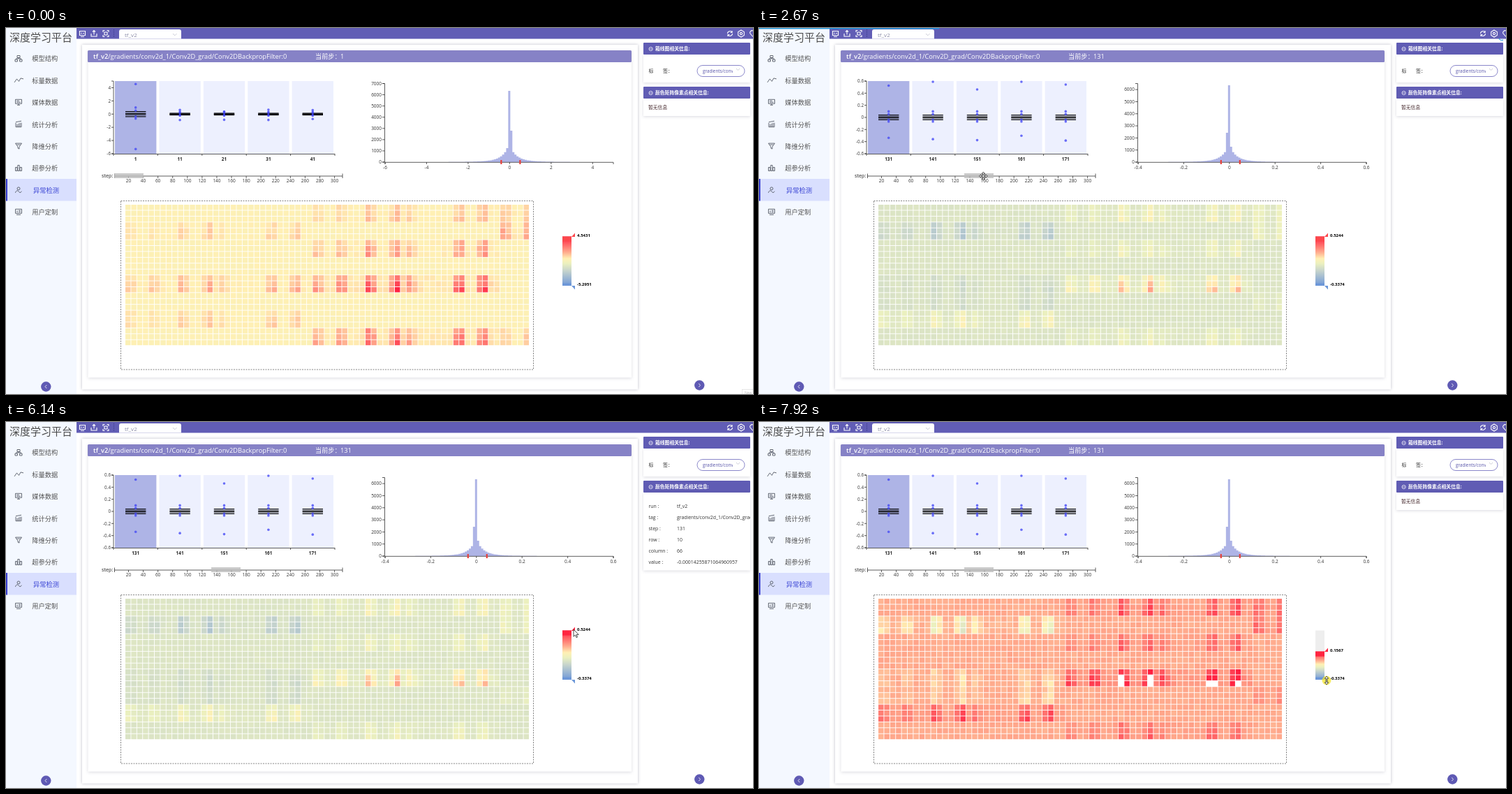
Write an HTML page that moves like this. It is 1070 by 524 pixels and loops after 7.99 s.

```html
<!DOCTYPE html>
<html lang="zh-CN">
<head>
<meta charset="utf-8">
<title>深度学习平台</title>
<style>
html, body { margin: 0; width: 1070px; height: 524px; overflow: hidden; background: #fff; }
svg { display: block; font-family: "Open Sans", "Noto Sans CJK SC", "Noto Sans CJK", sans-serif; }
.card { fill: #fff; filter: drop-shadow(0 0 2px rgba(70, 70, 100, .35)); }
.soft { fill: #fff; filter: drop-shadow(0 1px 2px rgba(70, 70, 100, .2)); }
.ico { fill: none; stroke: #555b66; stroke-width: .9; }
.wico { fill: none; stroke: #fff; stroke-width: 1.1; }
.thin { fill: none; stroke: #bfc1cf; stroke-width: .8; }
.ax { fill: none; stroke: #333; stroke-width: .8; }
</style>
</head>
<body>
<svg id="stage" width="1070" height="524" viewBox="0 0 1070 524" xmlns="http://www.w3.org/2000/svg">
  <defs>
    <linearGradient id="ramp" x1="0" y1="1" x2="0" y2="0"></linearGradient>
    <clipPath id="side"><rect x="913" y="0" width="153" height="524"/></clipPath>
    <clipPath id="pill"><rect x="995" y="50" width="46" height="24"/></clipPath>
  </defs>
  <g id="base"></g>
  <g id="boxes"></g>
  <g id="hist"></g>
  <rect id="brush" y="208" width="42" height="7" fill="#bdbdbd" fill-opacity=".8"/>
  <g id="heat"></g>
  <rect id="scroll" x="172" y="478" width="52" height="3.5" rx="1.7" fill="#b0b4e8"/>
  <g id="legend"></g>
  <g id="info"></g>
  <g id="load">
    <rect id="bar" width="0" height="1.4" fill="#2299dd"/>
    <path id="spin" d="M1059.5 13a4.5 4.5 0 0 1 4.5-4.5" fill="none" stroke="#2299dd"/>
  </g>
  <g id="tip">
    <rect x="1054.5" y="517.5" width="18" height="9" fill="#fff" stroke="#ddd" stroke-width=".7"/>
    <text x="1058" y="523.5" font-size="5" fill="#bbb">New</text>
  </g>
  <circle id="glow" r="6.5" fill="#f6e72c" fill-opacity=".75"/>
  <g id="pointer" fill="#fff" stroke="#222" stroke-width=".8">
    <path id="arrow" d="M0 0V10.2L2.4 8L4 11.6L5.6 10.9L4 7.4H7.2Z"/>
    <path id="move" d="M0-6L2.2-3.4H.8V-.8H3.4V-2.2L6 0L3.4 2.2V.8H.8V3.4H2.2L0 6L-2.2 3.4H-.8V.8H-3.4V2.2L-6 0L-3.4-2.2V-.8H-.8V-3.4H-2.2Z"/>
    <path id="resize" d="M0-6L2.6-2.8H.8V2.8H2.6L0 6L-2.6 2.8H-.8V-2.8H-2.6Z"/>
  </g>
</svg>
<script>
const LOOP = 7990, ROWS = 24, COLS = 69, PW = 8.39, PH = 8.42, GAP = .9;
const LEFT = 171, TOP = 253, CUT = .1567;
const $ = id => document.getElementById(id);
const lerp = (a, b, k) => a + (b - a) * k;
const mixAll = (a, b, k) => a.map((v, i) => lerp(v, b[i], k));
const clamp = (v, a = 0, b = 1) => Math.max(a, Math.min(b, v));
const ease = k => k * k * (3 - 2 * k);
const within = (t, a, b) => t >= a && t < b;
const show = (id, on) => $(id).setAttribute('visibility', on ? 'visible' : 'hidden');
const rand = (a, b) => { const n = Math.sin(a * 127.1 + b * 311.7) * 43758.5; return n - Math.floor(n); };

// y is the vertical middle of the text
const text = (x, y, size, str, fill = '#333', more = '') =>
  `<text x="${x}" y="${y + size * .36}" font-size="${size}" fill="${fill}" ${more}>${str}</text>`;
const rect = (x, y, w, h, fill, more = '') =>
  `<rect x="${x}" y="${y}" width="${w}" height="${h}" fill="${fill}" ${more}/>`;
const soft = (x, y, w, h, cls = 'soft') => `<rect class="${cls}" x="${x}" y="${y}" width="${w}" height="${h}"/>`;
const path = (d, cls, more = '') => `<path d="${d}" class="${cls}" ${more}/>`;
const MID = 'text-anchor="middle"', END = 'text-anchor="end"', BOLD = 'font-weight="700"';

// point along keys [t, ...values], with eased legs
function track(keys, t) {
  let i = 0;
  while (i < keys.length - 2 && t >= keys[i + 1][0]) i++;
  const a = keys[i], b = keys[i + 1];
  return mixAll(a, b, ease(clamp((t - a[0]) / (b[0] - a[0])))).slice(1);
}

const STOPS = [[0, 0x6f98d8], [.31, 0xc8d5cc], [.45, 0xebf0bf], [.55, 0xfff0b4], [.68, 0xffac8e], [1, 0xff1f40]]
  .map(([p, c]) => [p, c >> 16, c >> 8 & 255, c & 255]);
function tint(k) {
  k = clamp(k);
  const i = Math.max(1, STOPS.findIndex(s => s[0] >= k)), a = STOPS[i - 1], b = STOPS[i];
  return `rgb(${mixAll(a, b, (k - a[0]) / (b[0] - a[0])).slice(1).map(Math.round)})`;
}

// patches [row group, channel block, strength]; settle: size of later steps against the first
const SETS = [
  { lo: -5.2951, hi: 4.5431, yMin: -6, yMax: 5, xMin: -6, xMax: 5, top: 7000, whisker: 3.6, settle: .12, lean: 0,
    gain: [[4, 1, .8], [7, 1, .66], [2, 1, .44], [0, 1, .25], [4, 0, .32], [6, 0, .19], [1, 0, .17], [1, 2, .7], [0, 2, .35], [7, 2, .35]] },
  { lo: -.4624, hi: .5697, yMin: -.8, yMax: 1, xMin: -.5, xMax: .6, top: 6500, whisker: 3, settle: 1, lean: 0,
    gain: [[4, 1, .6], [6, 0, .6], [0, 2, .9], [7, 1, .32], [1, 2, -.3]] },
  { lo: -.3374, hi: .5244, yMin: -.6, yMax: .6, xMin: -.4, xMax: .6, top: 6500, whisker: 3.3, settle: 1, lean: 1,
    gain: [[4, 1, .42], [1, 0, -.24], [6, 0, .22], [0, 1, .22], [2, 1, .18], [7, 1, .16], [4, 0, -.1], [5, 0, -.09], [0, 2, .25], [1, 2, .28], [5, 2, .12]] }
];
for (const s of SETS) {
  const grid = Array(24).fill(0);
  for (const [g, b, v] of s.gain) grid[g * 3 + b] = v * s.hi;
  s.gain = grid;
}
const blend = (a, b, k) => Object.fromEntries(Object.keys(a).map(n =>
  [n, Array.isArray(a[n]) ? mixAll(a[n], b[n], k) : lerp(a[n], b[n], k)]));

// active channels: bumps [centre, height] repeated every 32 columns
const BUMPS = [[.4, .52], [4.4, .58], [9.3, .92], [13.8, 1], [16.2, .5], [24.6, .95], [28.7, 1]];
const channel = c => Math.max(.08, ...BUMPS.map(([m, h]) => h * Math.exp(-1.2 * (c % 32 - m) ** 2)));
const heatAt = (s, r, c) =>
  s.gain[(r / 3 | 0) * 3 + (c >> 5)] * channel(c) * (.82 + r % 3 * .16) * (.8 + .4 * rand(c, r))
  + (rand(r, c) - .5) * (s.hi - s.lo) * .02;

function ticks(min, max) {
  const raw = (max - min) / 9.1, mag = 10 ** Math.floor(Math.log10(raw));
  const inc = mag * [1, 2, 5, 10].find(m => m * mag >= raw), list = [];
  for (let i = Math.ceil(min / inc - .01); i * inc <= max + inc * .01; i++) list.push(i * inc);
  return list;
}
const label = v => +v.toFixed(1) || 0;

function drawBoxes(s, step) {
  const yOf = v => 180 - (v - s.yMin) / (s.yMax - s.yMin) * 104, zero = yOf(0);
  let out = '', marks = '', axis = 'M151 76H154V180H151M154 180.5H471';
  for (const v of ticks(s.yMin, s.yMax)) {
    axis += `M151 ${yOf(v)}h3`;
    out += text(150, yOf(v), 6.3, label(v), '#333', END);
  }
  for (let i = 0; i < 6; i++) axis += `M${154 + i * 63.4} 180v3`;
  for (let i = 0; i < 5; i++) {
    const x = 185.7 + i * 63.4, at = step + i * 10;
    const w = s.whisker * (i ? s.settle ** .5 : 1);
    const reach = side => i ? s.settle * lerp(.6, 1.5, rand(at, side)) : 1;
    out += rect(x - 29.7, 76, 59.4, 104, i ? '#edf0fe' : '#aeb4e6');
    for (const k of [-1, -.25, .25, 1])
      marks += path(`M${x - 14.7} ${zero + k * w}h29.4`, '', 'stroke="#000" stroke-width="1.2"');
    const ends = [yOf(s.hi * reach(1)), yOf(s.lo * reach(2))].map(y => clamp(y, 77, 179));
    for (const y of [...ends, zero - 2.6 * w, zero - 1.4 * w, zero + w, zero + 1.8 * w])
      marks += `<circle cx="${x}" cy="${y}" r="1.8" fill="#4347f5" fill-opacity=".78"/>`;
    marks += text(x, 187.5, 6.4, at, '#222', MID + BOLD);
  }
  $('boxes').innerHTML = out + path(axis, 'ax') + marks;
}

function drawHist(s) {
  const px = 327 / (s.xMax - s.xMin), zero = 543 - s.xMin * px, unit = 112.5 / s.top;
  let d = '', out = '', axis = 'M539 79.5H542.5V192H539M543 195V192.3H870V195';
  const near = { 0: 6350 * unit, '-1': lerp(20, 42, s.lean), 1: lerp(45, 22, s.lean) };
  for (let i = -48; i <= 64; i++) {
    const n = Math.abs(i), x = zero - 2 + i * 2.95;
    const h = near[i] || 20 * Math.exp(-n / 3) + 5 * Math.exp(-n / 8);
    if (within(x, 543, 867) && h > .1) d += `M${x} 192v${-h}h3v${h}z`;
  }
  for (let v = 0; v <= s.top; v += 1000) {
    axis += `M539 ${192 - v * unit}h3.5`;
    out += text(538, 192 - v * unit, 6.5, v, '#333', END);
  }
  for (const v of ticks(s.xMin, s.xMax)) {
    axis += `M${zero + v * px} 192v3`;
    out += text(zero + v * px, 200, 6.5, label(v), '#333', MID);
  }
  for (const dx of [-12, 15]) out += rect(zero + dx - 1.1, 189, 2.2, 6, '#e8403c');
  $('hist').innerHTML = `<path d="${d}" fill="#aeb4e6"/>` + path(axis, 'ax') + out;
}

const cells = [];
function buildHeat() {
  let out = '';
  for (let r = 0; r < ROWS; r++) for (let c = 0; c < COLS; c++)
    out += rect((LEFT + c * PW).toFixed(2), (TOP + r * PH).toFixed(2), PW - GAP, PH - GAP, '#fff');
  $('heat').innerHTML = out;
  cells.push(...$('heat').children);
}
function drawHeat(s, hi) {
  cells.forEach((cell, i) => {
    const v = heatAt(s, i / COLS | 0, i % COLS);
    cell.setAttribute('fill', v > hi ? '#fff' : tint((v - s.lo) / (hi - s.lo)));
  });
}

const handleY = (s, v) => 298.5 + 70.5 * (s.hi - v) / (s.hi - s.lo);
function drawLegend(s, v, warm) {
  const y = handleY(s, v), red = warm ? '#ff2440' : '#fc474c', blue = '#6c97d8';
  $('legend').innerHTML = rect(797, 298.5, 13, 70.5, '#eeeeee') + rect(797, y, 13, 369 - y, 'url(#ramp)') +
    rect(797, y, 13, 7, red) + rect(797, 365.5, 13, 3.5, blue) +
    `<path d="M810 ${y + .5}l5-5.5v5.5z" fill="${red}"/><path d="M810 369h5v5.5z" fill="${blue}"/>` +
    text(818, y - 1.6, 6, v.toFixed(4), '#000', BOLD) + text(818, 367, 6, s.lo.toFixed(4), '#000', BOLD);
}

// time, row, column, value of the hovered cell
const HOVER = [
  [350, 16, 45, '0.33107742667198181'], [3420, 13, 39, '0.03319472074508667'], [3700, 10, 62, '-0.0025850934907794'],
  [4550, 10, 50, '-0.0081936240196228'], [4950, 15, 37, '0.04144066199660301'], [5560, 10, 66, '-0.00014255871064960957']
];
function drawInfo(on, step, cell) {
  let out = soft(913, 101, 153, on ? 111.5 : 25);
  if (on) {
    const rows = { run: 'tf_v2', tag: 'gradients/conv2d_1/Conv2D_grad/Conv2DBackpropFilter:0', step,
      row: cell[1], column: cell[2], value: cell[3] };
    Object.entries(rows).forEach(([k, v], i) => {
      const y = 120.5 + i * 16;
      out += text(920.5, y, 6.9, k + ' :') + text(961, y, 6.9, v, '#333', 'clip-path="url(#side)"');
    });
  } else out += text(920, 114, 6.8, '暂无信息', '#43262a');
  $('info').innerHTML = out;
}

const MENU = {
  模型结构: 'M-2-4h4v3h-4zM-5 1.5h3.4v3h-3.4zM1.6 1.5h3.4v3h-3.4zM0-1V.3M-3.3 1.5V.3H3.3V1.5',
  标量数据: 'M-6 3L-2.5-2L.5 1.5L3-3L7-2',
  媒体数据: 'M-4.5-4h9v6h-9zM-2 4h4M-3-2h4M-3 0h6M0 2v2',
  统计分析: 'M-4-2V4H4V-2M-2 4V0M0 4V-1M2 4V-2M-4-3L4-4.5',
  降维分析: 'M-4.5-4H4.5L1 1V4L-1 3V1ZM-2.5-2H2.5',
  超参分析: 'M-4.5-1H-2V4H-4.5ZM-1.2-4H1.2V4H-1.2ZM2-1H4.5V4H2Z',
  异常检测: 'M-2-2a2 2 0 1 0 4 0a2 2 0 1 0-4 0M-4.5 4C-4 1-1 0 0 2L2 4L4.5 2',
  用户定制: 'M-4.5-4h9v6h-9zM-3 4h6M-2-2v3M0-2h3M0 0h3'
};

function sidebar() {
  let o = rect(0, 0, 101, 524, '#f4f8ff') + text(5, 14, 15, '深度学习平台', '#4c4c4c');
  o += rect(0, 216, 101, 31.5, '#d9dffe') + rect(0, 216, 2, 31.5, '#3c42d2');
  Object.entries(MENU).forEach(([name, icon], i) => {
    const y = 44 + i * 31.4, on = i === 6;
    o += path(icon, 'ico', `transform="translate(18 ${y - .5})"`);
    o += text(on ? 39 : 37.3, y, 9.25, name, on ? '#3a44d4' : '#555');
  });
  return o;
}

function topBar() {
  return rect(101, 0, 969, 15.5, '#615db5') +
    path('M105.5 4.5h8v6h-8zM107 12.5h5M108 6.5v2M110 7.5h2M126 3.5v6M124 5.5l2-2l2 2M122 8v4h8v-4', 'wico') +
    path('M139 6V3.5h2.5M144.5 3.5H147V6M147 10v2.5h-2.5M141.5 12.5H139V10M141 6h4v4h-4z', 'wico') +
    path('M154.5 2V14', '', 'stroke="#3d3a8c" stroke-dasharray="1.5 1.5"') +
    path('M162 15.5V5q0-3 3-3H248q3 0 3 3V15.5Z', '', 'fill="#fff"') + text(170, 10, 8, 'tf_v2', '#8b8ca8') +
    path('M239 8l2.8 2.8l2.8-2.8', 'thin') +
    path('M1033.5 8a3.5 3.5 0 0 1 6.5-1.7M1040.5 8a3.5 3.5 0 0 1-6.5 1.7M1040 4v2.5h-2.5M1034 12V9.5h2.5', 'wico') +
    path('M1053 3l4.3 2.5v5L1053 13l-4.3-2.5v-5ZM1051.4 8a1.6 1.6 0 1 0 3.2 0a1.6 1.6 0 1 0-3.2 0', 'wico') +
    path('M1070 12.5L1066 8a3 3 0 0 1 4-4', 'wico');
}

function mainCard() {
  let o = soft(109, 24, 796, 493.5, 'card') + soft(117.5, 32.5, 778.5, 468) + rect(117, 32, 779, 17, '#8682c6', 'rx="1.5"');
  o += text(125, 41, 9.25, '<tspan font-weight="600">tf_v2</tspan>/gradients/conv2d_1/Conv2D_grad/Conv2DBackpropFilter:0', '#fff', 'font-weight="500"');
  o += text(443, 41, 9.2, '当前步：<tspan id="now" x="479"></tspan>', '#fff', 'font-weight="500"');
  let d = 'M155.5 208.5V215M482 208.5V215M155 212H482';
  for (let i = 1; i <= 15; i++) {
    const x = 154.4 + i * 21.08;
    d += `M${x} 212v3`;
    o += text(x, 218.5, 6.5, i * 20, '#333', MID);
  }
  return o + path(d, 'ax') + text(137, 211.5, 7.2, 'step:', '#222') +
    rect(164.5, 247.5, 591, 241.5, 'none', 'stroke="#777" stroke-width=".9" stroke-dasharray="2 1.5"');
}

function rightColumn() {
  let o = soft(913, 38, 153, 40);
  [[21, '箱线图相关信息:'], [84, '颜色矩阵像素点相关信息:']].forEach(([y, s]) => {
    o += rect(913, y, 153, 17, '#605cb4', 'rx="1"') + text(930, y + 9, 6.8, s, '#fff', BOLD);
    o += path(`M921 ${y + 9}a2.6 2.6 0 1 0 5.2 0a2.6 2.6 0 1 0-5.2 0m1.4 0h2.4`, 'wico', 'style="stroke-width:.8"');
  });
  return o + text(920.5, 61.5, 7, '标') + text(941, 61.5, 7, '签：') +
    rect(990, 53.5, 68, 16, '#fff', 'rx="8" stroke="#6d69bd" stroke-width=".8"') +
    text(998, 61.5, 6.3, 'gradients/conv2d', '#5552a8', 'clip-path="url(#pill)"') + path('M1046 58l2.5 2.5l2.5-2.5', 'thin');
}

const foldButton = (x, y, k) => `<circle cx="${x}" cy="${y}" r="7.2" fill="#5f5ab4"/>` +
  path(`M${x + k} ${y - 2.5}l${-2.2 * k} 2.5l${2.2 * k} 2.5`, 'wico', 'style="stroke-width:.8"');

function drawBase() {
  $('base').innerHTML = sidebar() + topBar() + mainCard() + rightColumn() +
    foldButton(57.3, 513.5, 1) + foldButton(993.3, 511.5, -1);
  $('ramp').innerHTML = STOPS.map(s => `<stop offset="${s[0]}" stop-color="${tint(s[0])}"/>`).join('');
}

const BRUSH = [[1020, 155], [1780, 213], [1850, 213], [2600, 294]];
const LOADS = [[1240, 1855], [1960, 2600], [2600, 3020]];
const ENTER = [[210, 900, 380], [750, 330, 350], [950, 182, 212]];
const WANDER = [[3350, 322, 214], [3550, 480, 360], [3770, 690, 342], [3980, 803, 294], [4190, 803, 294], [4950, 486, 383],
  [5370, 525, 391], [5790, 803, 293], [6000, 809, 321], [6140, 813, 297]];
const LEAVE = [[6960, 814, 328], [7100, 813, 351], [7170, 813, 351], [7380, 813, 370]];

function pointerAt(t, brushX, handle) {
  if (t < 950) return track(ENTER, t);
  if (t < 3350) return [brushX + 27.3, 212];
  if (t < 6340) return track(WANDER, t);
  return t < 6960 ? [813.5, handle - 1] : track(LEAVE, t);
}

const seen = {};
function changed(name, ...key) {
  const same = seen[name] === key.join();
  seen[name] = key.join();
  return !same;
}

function render(t) {
  const [bx] = track(BRUSH, t);
  const step = Math.floor((bx - 154.4) / 10.54) * 10 + 1;
  const s = step <= 51 ? blend(SETS[0], SETS[1], ((step - 1) / 50) ** .4) : blend(SETS[1], SETS[2], (step - 51) / 80);
  const cut = t >= 6960, warm = t >= 4190;
  const limit = lerp(s.hi, CUT, ease(clamp((t - 6340) / 420)));
  $('brush').setAttribute('x', bx);
  if (changed('data', step)) {
    drawBoxes(s, step);
    drawHist(s);
    $('now').textContent = step;
  }
  if (changed('heat', step, cut)) drawHeat(s, cut ? CUT : s.hi);
  if (changed('legend', step, limit, warm)) drawLegend(s, limit, warm);
  const info = within(t, 350, 1100) || within(t, 3420, 6960);
  const cell = HOVER.filter(h => h[0] <= t).pop();
  if (changed('info', info, step, cell)) drawInfo(info, step, cell);

  const [x, y] = pointerAt(t, bx, handleY(s, limit));
  const kind = within(t, 950, 3400) ? 'move' : t >= 7580 ? 'resize' : 'arrow';
  $('pointer').setAttribute('transform', `translate(${x} ${y})`);
  for (const k of ['arrow', 'move', 'resize']) show(k, t >= 210 && k === kind);
  $('glow').setAttribute('cx', x);
  $('glow').setAttribute('cy', y);
  show('glow', within(t, 6340, 7030) || t >= 7850);
  show('scroll', within(t, 280, 880) || (within(t, 4190, 5790) && x < 755));
  show('tip', t < 70);

  const run = LOADS.find(l => within(t, ...l));
  show('load', run);
  if (run) {
    $('bar').setAttribute('width', 1070 * ((t - run[0]) / (run[1] - run[0])) ** .8);
    $('spin').setAttribute('transform', `rotate(${t * .9 % 360} 1064 13)`);
  }
}

drawBase();
buildHeat();
const start = performance.now();
function tick() {
  render((performance.now() - start) % LOOP);
  requestAnimationFrame(tick);
}
tick();
</script>
</body>
</html>
```
